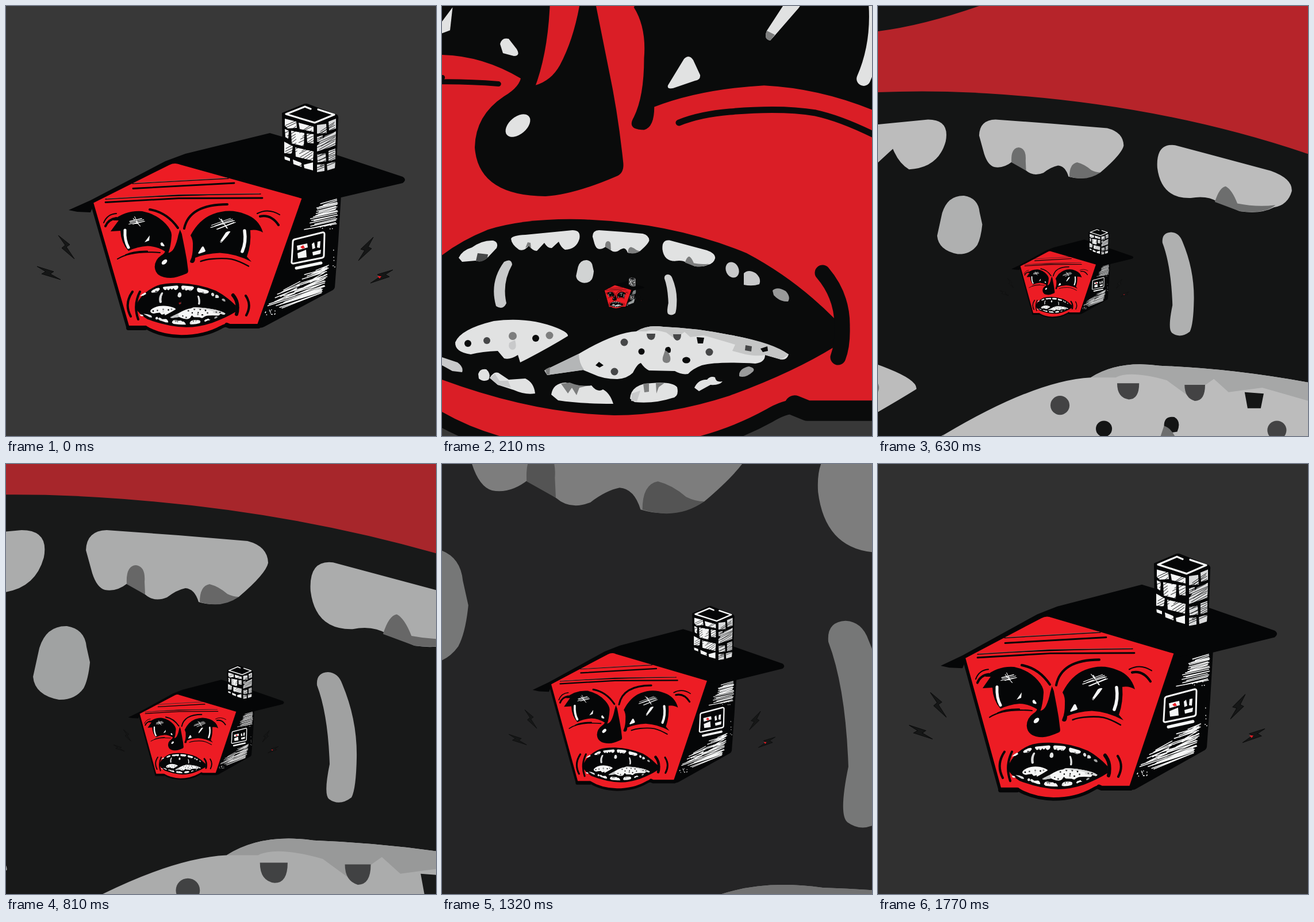
An HTML page for the animation above (1.8 s loop, 748 by 748 pixels).

```html
<!DOCTYPE html>
<html lang="en">
<head>
<meta charset="utf-8">
<title>House within a house</title>
<style>
  @property --p { syntax: "<number>"; inherits: true; initial-value: 0; }
  @keyframes zoom { from { --p: 0; } to { --p: 1.016949; } }
  html, body { margin: 0; width: 100%; height: 100%; overflow: hidden; background: #383838; }
  svg { display: block; width: 100%; height: 100%; animation: zoom 1800ms steps(60) infinite; }
  .outer {
    transform-origin: 317.3px 514.3px;
    transform: scale(calc(1 + 29 * var(--p)));
    opacity: calc(1 - .85 * var(--p));
  }
  .inner {
    transform: translate(302px, 518px) scale(calc(.01 + .99 * var(--p)))
      translate(-302px, -541.2px) scale(1, 1.054);
  }
  .k { fill: #050607; }
  .r { fill: #ed1c24; }
  .w { fill: #f5f6f6; }
  .l { fill: #d9dadb; }
  .g { fill: #858686; }
  .d { fill: #48494a; }
  .line { fill: none; stroke: #050607; stroke-linecap: round; stroke-linejoin: round; }
  .chalk { fill: none; stroke: #f5f6f6; stroke-linecap: round; stroke-linejoin: round; }
</style>
</head>
<body>
<svg viewBox="0 0 748 748">
  <defs>
    <g id="house">
      <!-- bolts -->
      <g fill="#161717" stroke="#0b0c0c">
        <path d="M91 399L111 415L105 419L119 440L97 421L103 416Z"/>
        <path d="M54 453L83 462L77 466L95 476L62 466L69 462Z"/>
        <path d="M639 402L617 423L624 425L613 443L636 422L630 419Z"/>
        <path d="M673 459L646 467L652 470L634 482L667 471L660 467Z"/>
      </g>
      <path class="r" d="M646 470L653 470L650 474Z"/>

      <!-- side wall and roof -->
      <path class="k" d="M505 325L583 328L578 410L572 489Q571 493 567 495L449 558Q442 562 436 557Z"/>
      <path class="k" d="M109 355L147 338L277 270L312 257L459 221L483 228L578 260L690 297Q698 302 690 308L583 333L518 340L153 345L147 359L124 358Z"/>
      <path id="wall" class="chalk" stroke-width="1.5"/>
      <path id="specks" class="chalk" stroke-width="1.7"/>

      <!-- window -->
      <path class="chalk" stroke-width="3" d="M502 406L550 394Q554 393 554 397L553 434Q553 437 550 438L500 448Q496 448 497 444L499 410Q499 407 502 406Z"/>
      <path class="chalk" stroke-width="5" d="M505 456L548 447"/>
      <path class="w" d="M506 417L524 413L525 420L507 425ZM507 430L522 424L523 437L508 439ZM532 414L536 411L538 421L533 423ZM542 410L547 409L546 421L541 420ZM533 428L548 424L547 431L534 434Z"/>
      <path class="r" d="M512 419L517 416L520 421L515 422Z"/>

      <!-- chimney -->
      <path class="k" d="M480 186L519 170Q523 169 527 171L576 189Q579 192 578 196L575 283Q574 288 545 293Q510 284 483 270Q480 268 481 262Z"/>
      <path class="chalk" stroke-width="3.2" d="M530 179L520 175L487 188L537 203L571 189L543 180"/>
      <path class="w" d="M485 196L505 201L506 212L490 213L485 208ZM509 203L535 210L535 219L511 214ZM485 214L492 217L491 231L486 228ZM496 217L519 221L518 244L497 239ZM523 222L535 223L535 239L524 238ZM484 236L499 244L497 257L484 256ZM503 246L535 253L534 269L504 262ZM484 261L494 265L494 270L485 267ZM499 267L514 273L514 280L500 275ZM518 276L534 272L534 286L519 282Z"/>
      <path class="l" d="M541 207L557 205L558 221L541 222ZM561 201L574 196L574 213L562 217ZM541 227L551 225L551 237L541 236ZM555 226L574 218L573 243L541 253L541 243ZM541 258L556 256L557 270L542 272ZM561 252L573 248L573 267L561 270ZM541 276L554 275L554 287L541 289ZM558 274L573 271L572 282L559 286Z"/>
      <path id="brick" class="line" stroke-width=".9"/>

      <!-- face -->
      <path class="r" stroke="#050607" stroke-width="5.5" stroke-linejoin="round" d="M149 341L283 274Q293 269 303 273L518 333L439 557L390 557Q384 553 374 559Q345 575 305 575Q268 574 243 559L212 559Z"/>
      <path class="line" stroke-width="8" d="M439 557L389 557L384 555M213 560L242 560"/>
      <path class="line" stroke-width="1.3" d="M220 309L387 300M173 336L300 329L443 327"/>
      <path stroke="#85595a" stroke-width=".8" d="M222 308L385 299M175 335L300 328L441 326"/>
      <path class="line" stroke-width="2.8" d="M221 317.500L397 308M173 341.500L300 334.500L446 334"/>

      <!-- brows and wrinkles -->
      <path class="line" stroke-width="4" d="M250 354Q280 359 299 386M310 387Q319 345 385 345M442 366Q461 362 474 381M173 383Q178 371 192 369M220 497Q205 518 217 540M233 497Q221 520 230 545M417 504Q428 520 418 538"/>
      <path class="line" stroke-width="2" d="M437 361Q456 351 476 363M170 377Q176 362 192 361M194 440Q218 425 268 429M208 433Q222 426 246 426.500"/>

      <!-- eyes -->
      <path class="k" d="M182 392Q187 385 196 373L186 373Q208 355 237 357Q262 362 278 379Q289 391 288 400Q287 418 282 431L277 427Q262 418 246 417.600Q228 419 213 426Q200 412 199 391Z"/>
      <path class="k" d="M321 399Q336 371 360 362Q389 351 416 362Q440 370 447 394Q437 388 425 390Q427 415 419 436L427 445Q400 431 372 429.600Q347 431 329 438Q329 446 325 447Q318 447 321 442Q325 434 325 419Q326 407 321 399Z"/>
      <path class="chalk" stroke-width="5" d="M207 390Q206 408 213 420"/>
      <path class="chalk" stroke-width="5.500" d="M415 391Q418 411 411 427"/>
      <path class="w" d="M250 399L241 411L249 408Z"/>
      <path id="glint" class="chalk" stroke="#c9caca" stroke-width="1.1"/>

      <!-- nose, eye shards, mouth -->
      <g transform="translate(245.850 398.490) scale(.22519)">
        <path class="w" d="M101 66Q104 54 116 57L130 75Q137 87 125 87L106 82ZM393 138L421 92Q430 83 437 94L449 120Q450 129 440 130L402 143Q391 145 393 138ZM565 43Q559 58 571 60L580 50L620 4L642 -27Q630 -35 606 -20Z"/>
        <path class="g" d="M565 43Q559 58 571 60L579 50Z"/>
        <path class="line" stroke-width="11" d="M412 203Q450 188 500 184Q590 176 650 186Q705 198 782 240"/>
        <path class="k" d="M252 -42L239 0Q228 60 205 103Q190 130 162 138L138 120Q137 140 108 157Q58 190 57 246Q63 330 180 331Q230 328 304 296Q318 290 315 270Q306 185 290 110L266 -10Z"/>
        <ellipse class="w" cx="132" cy="208" rx="25" ry="15" transform="rotate(-40 132 208)"/>

        <path class="k" d="M-84 535Q-35 435 80 389Q145 369 240 371Q400 376 530 430Q615 475 684 545L684 592Q610 638 500 678Q395 712 300 712Q160 709 0 650Q-55 615 -84 575Z"/>
        <path class="line" stroke-width="27" d="M662 464Q697 505 696 558Q697 590 689 611"/>

        <path class="w" d="M29 438Q35 425 52 420Q70 407 89 408Q99 411 95 421L80 437Q70 447 58 443L35 445ZM120 405Q122 399 145 398L227 390Q242 390 239 405Q234 423 214 424Q207 420 203 410L191 421Q184 422 178 412L165 426Q158 426 151 417Q143 427 134 424Q121 415 120 405ZM-58 472L-38 455L-15 443L-8 454L-30 467Z"/>
        <path class="d" d="M59 443L62 430L80 432L79 438Q68 448 59 443Z"/>
        <path class="g" d="M145 421L149 411L154 412L155 422L151 417Z"/>
        <path class="l" d="M108 445Q121 438 122 450Q104 482 112 517Q106 530 94 522Q82 480 108 445ZM525 465Q533 457 546 465Q556 474 552 484Q540 488 525 485ZM-30 608L0 611L27 620Q38 628 35 637L18 635Z"/>
        <ellipse class="l" cx="505" cy="459" rx="11" ry="14" transform="rotate(-25 505 459)"/>
        <path fill="#a5a6a6" d="M575 495Q583 487 598 496Q607 506 602 514Q588 515 577 503ZM517 640Q519 630 534 627Q546 630 541 636Q528 648 517 644Z"/>

        <!-- tongue -->
        <path class="w" d="M23 585Q32 562 90 548Q150 540 200 560Q220 568 219 574Q190 592 148 614L136 620L132 607Q118 616 108 613L97 600Q70 601 50 606Q22 602 23 585Z"/>
        <path class="w" d="M178 634L238 605Q300 568 338 566Q357 554 385 558Q440 560 500 572Q560 582 603 606Q600 616 590 615L562 607Q562 620 545 622Q480 618 452 625Q436 631 428 640Q417 642 405 635L360 634Q352 630 346 621Q340 622 332 638Q322 648 305 649Q280 649 262 640L245 633L183 642Z"/>
        <path fill="#c3c5c6" d="M178 634L238 605Q238 620 247 633L183 642Z"/>
        <path class="g" d="M180 632L188 628L187 641L182 641Z"/>
        <path fill="#d6d7d7" d="M338 566Q357 554 385 558Q440 560 500 572Q575 585 603 606L590 615L562 607Q550 610 528 606L505 600L510 589Q480 580 455 573L432 576L422 567L405 579L390 568Q365 561 355 566Z"/>
        <g class="k">
          <circle cx="45" cy="587" r="6"/><circle cx="163" cy="578" r="6"/><circle cx="347" cy="601" r="5.500"/>
          <path d="M443 576L456 577L454 587L445 587ZM388 599Q388 592 395 593Q400 596 397 603L391 604ZM267 625L273 619L281 625L274 629Z"/>
          <ellipse cx="425" cy="616" rx="7" ry="5.500"/><path d="M554 596L566 592L567 600L558 602Z"/>
        </g>
        <g class="d">
          <circle cx="78" cy="582" r="6"/><circle cx="317" cy="585" r="6.500"/><circle cx="300" cy="636" r="6.500"/>
          <circle cx="465" cy="602" r="6.500"/>
          <path d="M356 570L371 570Q371 581 364 581Q356 580 356 570ZM402 571L416 571Q416 582 409 582Q402 580 402 571ZM528 590L539 592L538 601L527 599Z"/>
        </g>
        <circle class="g" cx="123" cy="574" r="7"/><circle class="g" cx="187" cy="573" r="6.500"/>
        <path class="l" d="M117 586L127 581Q132 598 122 598Q114 596 117 586Z"/>
        <path class="g" d="M388 599Q394 601 397 610Q399 621 390 621Q382 620 384 611Z"/>

        <!-- lower teeth -->
        <path class="w" d="M63 640Q66 630 77 632Q86 640 81 650Q72 655 64 648ZM83 647Q90 635 98 638L116 650L145 648Q160 655 162 674Q145 677 125 668L97 659ZM190 676Q193 656 215 655Q240 663 260 660Q270 673 280 667Q292 673 298 692Q240 692 202 686ZM327 683Q329 657 365 656Q400 653 409 663Q413 680 400 682Q370 692 335 689ZM439 664Q446 649 461 650Q467 643 475 646Q476 655 488 653Q483 660 467 659L447 670ZM-60 613L-38 615L-28 626L-50 626Z"/>
        <path class="g" d="M207 657L222 655Q240 662 252 661L239 664L234 677L226 664L219 674ZM350 657L360 656L360 671L352 672ZM372 656L388 655L377 663L373 674Z"/>
        <path class="l" d="M83 647L92 640L100 652L115 652L120 664L97 659ZM330 674L345 669L339 688L329 687Z"/>
      </g>

      <g transform="translate(279.400 452.880) scale(.11943)">
        <path class="w" d="M442 342Q440 310 465 313L588 346Q616 356 615 372Q610 390 592 393Q575 402 548 398L520 386Q506 377 485 381Q447 382 442 342Z"/>
        <path class="g" d="M516 386Q522 367 530 366Q538 370 545 388Q570 393 594 390Q580 402 548 398Z"/>
      </g>

      <g transform="translate(295.070 478.260) scale(.07007)">
        <path class="w" d="M139 150Q140 116 175 115L300 124L420 134Q455 143 456 172Q452 191 405 231Q372 251 335 240Q328 217 312 216Q297 219 280 232Q258 241 242 227L212 207Q192 223 172 219Q158 215 150 190Z"/>
        <path class="g" d="M210 209Q208 177 226 176Q243 178 241 205L242 227ZM337 240Q337 212 354 209Q370 213 385 226Q395 231 405 231Q375 252 337 240Z"/>
        <path fill="#e3e5e5" d="M58 320Q70 281 106 282Q137 287 140 318L146 345Q143 375 135 390Q120 411 92 410Q50 402 47 370Z"/>
        <path fill="#e3e4e4" d="M541 385Q539 363 560 362Q578 363 585 383Q611 445 610 510Q609 565 601 580Q580 596 562 583Q552 575 563 522Q560 435 541 385Z"/>
      </g>
    </g>
  </defs>
  <use class="outer" href="#house"/>
  <use class="inner" href="#house"/>
</svg>
<script>
  let seed = 11;
  const rnd = () => (seed = seed * 16807 % 2147483647) / 2147483647;
  const mix = (a, b, t) => a + (b - a) * t;
  const jog = n => (rnd() - .5) * n;

  // Strokes running from edge a-b to edge c-d, with ragged ends.
  function hatch([ax, ay], [bx, by], [cx, cy], [dx, dy], count, rough) {
    let d = "";
    for (let i = 0; i < count; i++) {
      const t = i / (count - 1), lift = jog(2);
      d += `M${mix(ax, bx, t) + jog(rough)} ${mix(ay, by, t) + lift}` +
           `L${mix(cx, dx, t) + jog(rough / 3)} ${mix(cy, dy, t) + lift}`;
    }
    return d;
  }
  const dots = (x, y, w, h, count) => Array.from({ length: count },
    () => `M${x + rnd() * w} ${y + rnd() * h}h.1`).join("");
  const draw = (id, d) => document.getElementById(id).setAttribute("d", d);

  draw("wall",
    hatch([548, 345], [526, 388], [576, 337], [574, 378], 20, 14) +
    hatch([538, 459], [474, 526], [560, 450], [548, 500], 30, 22) +
    hatch([482, 495], [462, 521], [512, 480], [500, 506], 9, 14));
  draw("specks", dots(569, 418, 3, 40, 5) + dots(450, 527, 18, 11, 14) +
    dots(545, 380, 26, 9, 8) + dots(528, 465, 30, 8, 5));
  draw("brick",
    hatch([490, 207], [488, 262], [503, 199], [506, 252], 12, 10) +
    hatch([515, 216], [510, 278], [533, 206], [534, 264], 13, 10) +
    hatch([543, 218], [542, 286], [572, 202], [573, 272], 24, 14));
  draw("glint",
    hatch([211, 374], [217, 380], [236, 369], [242, 375], 5, 9) +
    hatch([222, 366], [224, 371], [231, 379], [234, 383], 3, 4) +
    hatch([357, 381], [366, 389], [391, 369], [400, 377], 6, 14) +
    hatch([370, 369], [375, 371], [383, 384], [386, 387], 3, 5));
</script>
</body>
</html>
```
